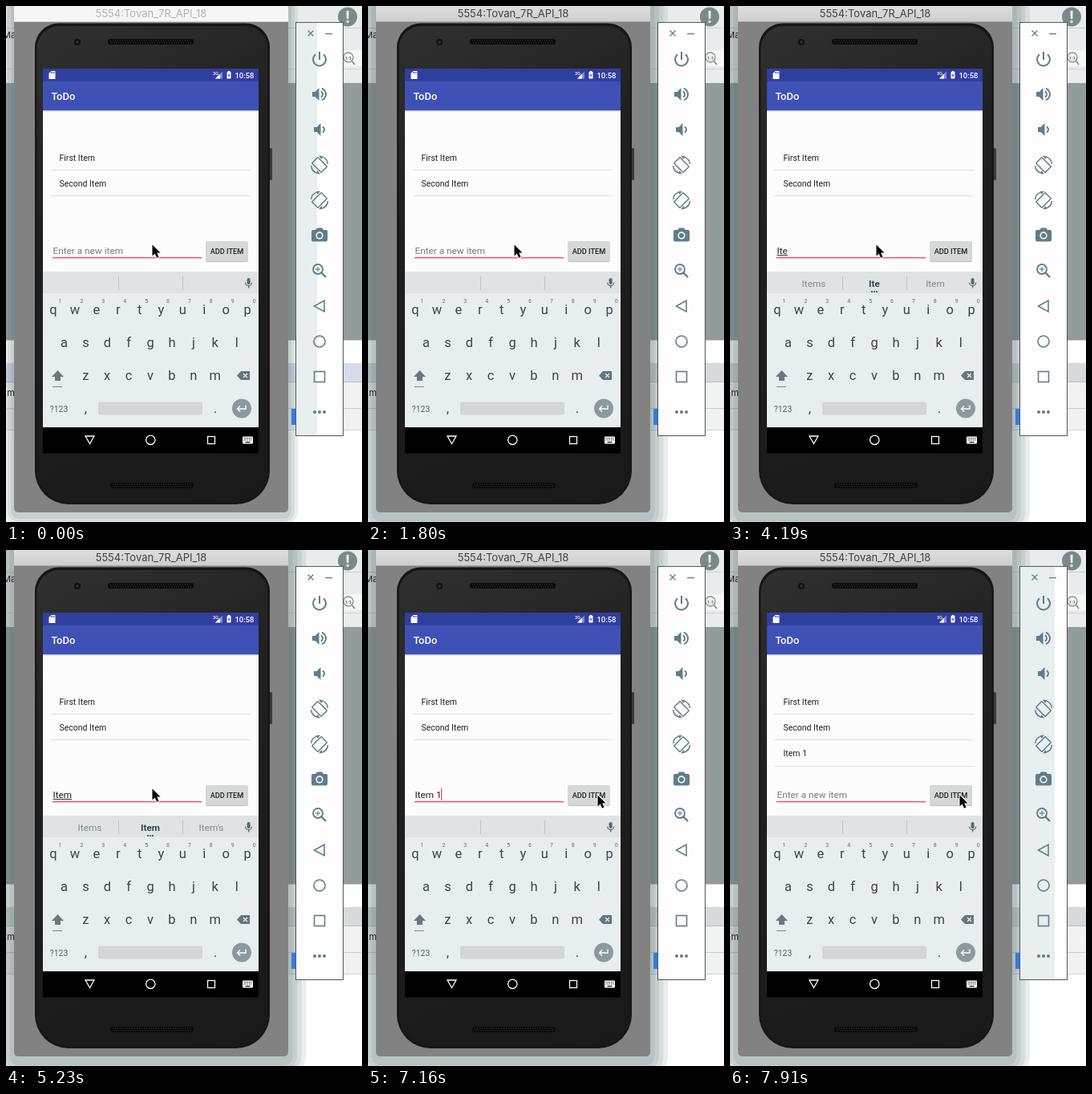
Animation, 444 px wide and 643 px high, one loop 8 s. Source, as an HTML page with a canvas:

```html
<!DOCTYPE html>
<html lang="en">
<head>
<meta charset="utf-8">
<title>ToDo on an emulator</title>
<style>
html, body { margin: 0; width: 100%; height: 100%; overflow: hidden; background: #fff; }
canvas { display: block; width: 444px; height: 643px; }
</style>
</head>
<body>
<canvas id="stage" width="444" height="643"></canvas>
<script>
const c = document.getElementById('stage').getContext('2d');
const LOOP = 8000;
const SLATE = '#607d8b', KEY = '#37474f', PINK = '#ff4081';
const ROBOTO = 'Roboto, sans-serif', INTER = 'Inter, sans-serif';
const LEFT = 46, WIDTH = 269;

// [time, text, caret shown, composing, suggestions]
const IT = ['If', 'It', "It's"], ITE = ['Items', 'Ite', 'Item'], ITEM = ['Items', 'Item', "Item's"];
const typing = [
  [0, '', 0], [150, '', 1], [600, '', 0], [1050, '', 1], [1650, '', 0],
  [2100, '', 1], [2700, '', 0],
  [3000, 'I', 1, 1], [3150, 'I', 1, 1, ["I'm", 'I', "I'll"]],
  [3290, 'It', 1, 1, IT], [3590, 'Ite', 1, 1, IT],
  [3740, 'Ite', 1, 1, ITE], [4190, 'Ite', 0, 1, ITE],
  [4490, 'Item', 1, 1, ITE], [4640, 'Item', 1, 1, ITEM], [5230, 'Item', 0, 1, ITEM],
  [5680, 'Item', 1, 1, ITEM], [5830, 'Item ', 1, 0],
  [5980, 'Item 1', 1, 0], [6580, 'Item 1', 0, 0], [7010, 'Item 1', 1, 0],
  [7460, '', 1], [7910, '', 0]
];
const presses = [[0, '#d6d7d7'], [7310, '#c4c5c5'], [7460, '#cacbcb'], [7610, '#d0d1d1'], [7760, '#d6d7d7']];
const moves = [[0, 0], [6430, 0.06], [6580, 0.32], [6730, 0.68], [6860, 0.92], [7010, 1]];
const tints = [[0, 26], [1800, 0], [7310, 43]]; // width of the panel's grey part
const at = (list, t) => list.filter(s => s[0] <= t).pop();

function rect(x, y, w, h, fill) { c.fillStyle = fill; c.fillRect(x, y, w, h); }
function round(x, y, w, h, r, fill) {
  c.beginPath(); c.roundRect(x, y, w, h, r);
  c.fillStyle = fill; c.fill();
}
function disc(x, y, r, fill) {
  c.beginPath(); c.arc(x, y, r, 0, 7);
  c.fillStyle = fill; c.fill();
}
function ring(x, y, r, color, w, from = 0, to = Math.PI * 2) {
  c.beginPath(); c.arc(x, y, r, from, to);
  c.strokeStyle = color; c.lineWidth = w; c.stroke();
}
function path(pts, x = 0, y = 0, closed) {
  c.beginPath();
  for (let i = 0; i < pts.length; i += 2) c.lineTo(x + pts[i], y + pts[i + 1]);
  if (closed) c.closePath();
}
function poly(pts, x, y, fill) { path(pts, x, y, true); c.fillStyle = fill; c.fill(); }
function line(pts, x, y, color, w, closed) {
  path(pts, x, y, closed);
  c.strokeStyle = color; c.lineWidth = w; c.stroke();
}
function text(s, x, y, size, color, align = 'left', weight = 400, family = ROBOTO) {
  c.font = `${weight} ${size}px ${family}`;
  c.textAlign = align;
  c.fillStyle = color;
  c.fillText(s, x, y);
}

function drawDesktop(active) {
  rect(0, 0, 444, 643, '#fff');
  rect(0, 0, 444, 96, '#e9ecec');
  rect(0, 27, 444, 1, '#c9cdcd');
  rect(0, 78, 444, 1, '#cfd3d3');
  rect(0, 96, 444, 320, '#929c9c');
  rect(0, 416, 444, 1, '#c4c8c8');
  rect(0, 445, 444, 23, active ? '#d6dada' : '#d6dcec');
  rect(0, 468, 444, 1, '#b9bdbf');
  rect(0, 469, 444, 32, '#f1f3f3');
  rect(0, 501, 444, 1, '#c8cccc');
  rect(0, 502, 444, 26, '#f0f2f2');
  rect(0, 528, 444, 1, '#d2d5d5');
  disc(426, 13.5, 12, '#7b8a89');
  text('!', 426, 20.5, 20, '#fff', 'center', 700);
  round(417, 55, 30, 20, 3, '#f5f6f6');
  ring(427, 64, 6, '#879292', 1.3);
  line([4, 4, 8, 9], 427, 64, '#879292', 1.8);
  text('1:1', 427, 66.5, 6, '#5f6a6a', 'center', 700);

  // banded window shadow
  const step = active ? 5.5 : 4;
  for (let i = active ? 4 : 3; i > 0; i--) {
    const d = i * step;
    round(10 - d, -20, 342 + d * 2, 651 + d + step, 6 + d, 'rgba(70,92,92,.11)');
  }
  text('Ma', -4, 40, 11, '#222', 'left', 400, INTER);
  text('.m', -2, 486, 11, '#222', 'left', 400, INTER);
  rect(356, 502, 5, 20, '#2d7fe0');

  round(10, -20, 342, 651, 5, '#828282');
  const g = c.createLinearGradient(0, 0, 0, 20);
  g.addColorStop(0, active ? '#dedede' : '#f6f6f6');
  g.addColorStop(1, active ? '#cdcdcd' : '#f6f6f6');
  rect(10, 0, 342, 20, g);
  rect(10, 19, 342, 1, active ? '#aaa' : '#d5d5d5');
  text('5554:Tovan_7R_API_18', 181, 14, 13, active ? '#404040' : '#b3b3b3', 'center', 400, INTER);
}

function grille(x, y, w) {
  round(x, y, w, 7, 3, '#0b0b0b');
  for (let i = 3; i < w - 2; i += 3) {
    rect(x + i, y + 1.5, 1, 1.3, '#303030');
    rect(x + i + 1, y + 4, 1, 1.3, '#303030');
  }
}

function drawPhone() {
  round(328, 177, 4, 40, 1.5, '#3a3a3a');
  const g = c.createLinearGradient(36, 22, 328, 620);
  g.addColorStop(0, '#303030');
  g.addColorStop(0.35, '#202020');
  g.addColorStop(1, '#191919');
  round(36, 21.5, 293, 599.5, [30, 30, 42, 42], '#161616');
  round(38.5, 25, 288, 593, [28, 28, 39, 39], g);
  disc(89, 45, 4, '#101010');
  disc(89, 45, 2, '#2b2e33');
  grille(127, 41, 107);
  grille(130, 594, 104);
}

function drawStatus() {
  rect(LEFT, 78, WIDTH, 16, '#303f9f');
  rect(LEFT, 94, WIDTH, 36, '#3f51b5');
  poly([3, 0, 8, 0, 8, 10, 0, 10, 0, 3], 53.5, 81, '#fff');
  [2.5, 4.3, 6.1].forEach(x => rect(53.5 + x, 82, 0.9, 2.2, '#303f9f'));
  text('3G', 258, 85.5, 5.5, '#fff', 'left', 500);
  poly([9, 0, 9, 9, 0, 9], 261, 81.5, 'rgba(255,255,255,.4)');
  poly([6, 3, 6, 9, 0, 9], 261, 81.5, '#fff');
  rect(276.7, 81, 2.6, 1.5, '#fff');
  round(275.5, 82, 5, 8.5, 0.7, '#fff');
  poly([3, 1.5, 1, 4.8, 2.4, 4.8, 2, 7.2, 4, 4, 2.7, 4], 275.5, 82, '#303f9f');
  text('10:58', 309.5, 89.5, 9.5, '#fff', 'right', 500);
  text('ToDo', 56.5, 116.5, 13, '#fff', 'left', 500);
}

function drawForm(s, t) {
  rect(LEFT, 130, WIDTH, 201, '#fcfcfc');
  rect(LEFT, 130, WIDTH, 1, '#c5c7cf');
  rect(LEFT, 131, WIDTH, 1, '#e8e8ea');
  const items = ['First Item', 'Second Item'];
  if (t >= 7460) items.push('Item 1');
  items.forEach((name, i) => {
    text(name, 66.5, 193 + i * 32.2, 10.5, '#212121');
    rect(56, 204 + Math.round(i * 32.4), 248, 1, '#dedede');
  });

  const [, word, caret, composing] = s;
  text(word || 'Enter a new item', 58.5, 309, 11.8, word ? '#212121' : '#7b7b7b');
  c.font = `400 11.8px ${ROBOTO}`;
  const end = 58.5 + c.measureText(word).width;
  if (composing) rect(58.5, 310, end - 58.5, 1, '#333');
  if (caret) rect(Math.round(end - 0.4), 297, 1.3, 15, PINK);
  rect(58, 313, 186, 1.4, PINK);

  round(249, 294, 53, 25, 2, '#bdbdbd');
  round(249, 293, 53, 25, 2, at(presses, t)[1]);
  text('ADD ITEM', 275.5, 309, 9.2, '#212121', 'center', 500);
}

function drawKeyboard(words) {
  rect(LEFT, 331, WIDTH, 27, '#dfe3e5');
  rect(LEFT, 358, WIDTH, 167, '#e8edf0');
  rect(140, 337, 1, 17, '#bcc3c6');
  rect(220, 337, 1, 17, '#bcc3c6');
  if (words) {
    words.forEach((w, i) => {
      text(w, [104.5, 180, 256][i], 350, 11.8, i === 1 ? KEY : '#7d8a90', 'center', i === 1 ? 700 : 400);
    });
    [176, 179, 182].forEach(x => rect(x, 355, 2, 2, '#55646b'));
  }
  round(300.6, 339, 4, 8, 2, '#58676e');
  ring(302.6, 344.5, 4, '#58676e', 1.2, 0, Math.PI);
  rect(302, 348.5, 1.3, 3, '#58676e');

  [['qwertyuiop', 59, 384], ['asdfghjkl', 72.5, 425], ['zxcvbnm', 99.3, 466]].forEach(([keys, x, y], row) => {
    [...keys].forEach((k, i) => {
      text(k, x + i * 26.9, y, 16.5, KEY, 'center');
      if (!row) text((i + 1) % 10, x + 8.5 + i * 26.9, 369.5, 7, '#607078', 'center');
    });
  });

  poly([7.5, 0, 15, 8, 11, 8, 11, 13, 4, 13, 4, 8, 0, 8], 57, 454, '#6b797f');
  rect(58, 474, 12, 1, '#7c898e');
  poly([5, 0, 16, 0, 16, 11, 5, 11, 0, 5.5], 288, 455, '#66757c');
  line([0, 0, 5, 5], 296, 458, '#e8edf0', 1.3);
  line([5, 0, 0, 5], 296, 458, '#e8edf0', 1.3);
  text('?123', 66, 505.5, 10.5, '#56656c', 'center');
  text(',', 99.5, 507, 17, KEY, 'center');
  round(115, 493.5, 130, 16, 2, '#d2d6d8');
  text('.', 261, 507, 17, KEY, 'center');
  disc(294, 501.5, 12, '#8c9a9e');
  line([11, -3.5, 11, 1, 1, 1], 288, 501, '#fff', 1.3);
  line([4, -2.5, 0.5, 1, 4, 4.5], 288, 501, '#fff', 1.3);
}

function drawNav() {
  rect(LEFT, 525, WIDTH, 32.5, '#000');
  line([-5.5, -4.5, 5.5, -4.5, 0, 5], 104.5, 540.5, '#fff', 1.3, true);
  ring(180.3, 540.8, 5.7, '#fff', 1.3);
  c.strokeRect(251.5, 536.5, 9, 9);
  round(295, 536.5, 13, 9, 1, '#fff');
  for (let i = 0; i < 5; i++) {
    rect(296.5 + i * 2.2, 538, 1.1, 1.1, '#000');
    rect(296.5 + i * 2.2, 540.3, 1.1, 1.1, '#000');
  }
  rect(298.5, 543, 6, 1.1, '#000');
}

function speaker(y, waves) {
  const x = waves < 2 ? 384 : 382;
  poly([0, -3, 3.5, -3, 8.5, -8, 8.5, 8, 3.5, 3, 0, 3], x, y, SLATE);
  ring(x + 9, y, 4, SLATE, 1.9, -1.1, 1.1);
  if (waves > 1) ring(x + 9, y, 8, SLATE, 1.9, -1.2, 1.2);
}

function rotateIcon(y, dir) {
  c.save();
  c.translate(391, y);
  c.scale(dir, 1);
  ring(0, 0, 10.5, SLATE, 1.5, -1.3, -0.1);
  ring(0, 0, 10.5, SLATE, 1.5, 1.84, 3.04);
  poly([-1, -11.5, 4, -11, 2.5, -7], 0, 0, SLATE);
  poly([1, 11.5, -4, 11, -2.5, 7], 0, 0, SLATE);
  c.rotate(Math.PI / 4);
  c.beginPath();
  c.roundRect(-8.2, -5.2, 16.4, 10.4, 1);
  c.strokeStyle = SLATE;
  c.lineWidth = 1.5;
  c.stroke();
  c.restore();
}

function drawPanel(t) {
  rect(361, 20, 60, 516, '#555');
  rect(362, 21, 58, 514, '#fdfdfd');
  rect(362, 21, at(tints, t)[1], 514, '#e9eeee');
  line([-3.5, -3.5, 3.5, 3.5], 380, 34, SLATE, 1.3);
  line([3.5, -3.5, -3.5, 3.5], 380, 34, SLATE, 1.3);
  rect(398, 34, 9, 1.3, SLATE);

  ring(391, 66.5, 8, SLATE, 2, -0.9, Math.PI + 0.9);
  rect(390, 57, 2, 10, SLATE);
  speaker(110, 2);
  speaker(154, 1);
  rotateIcon(198, 1);
  rotateIcon(242, -1);

  round(381, 279, 20, 14.5, 2, SLATE);
  poly([3, 0, 9, 0, 12, 4, 0, 4], 385, 276.5, SLATE);
  disc(391, 286, 4.7, '#f5f7f7');
  disc(391, 286, 3, SLATE);

  ring(389, 328, 6, SLATE, 1.8);
  line([4, 4, 10, 10], 389, 328, SLATE, 2.4);
  line([-3, 0, 3, 0], 389, 328, SLATE, 1.2);
  line([0, -3, 0, 3], 389, 328, SLATE, 1.2);

  line([-6.5, 0, 6, -7, 6, 7], 391, 374, SLATE, 1.6, true);
  ring(391, 418, 7, SLATE, 1.6);
  c.strokeRect(384.5, 455.5, 13, 13);
  [385, 391, 397].forEach(x => disc(x, 506, 2, SLATE));
}

function drawPointer(t) {
  const k = at(moves, t)[1];
  const x = 182.5 + 104 * k, y = 297.5 + 8 * k;
  const arrow = [0, 0, 0, 14, 3.2, 11, 5.6, 16.3, 8, 15.2, 5.7, 10, 10, 10];
  c.lineJoin = 'round';
  line(arrow, x, y, '#fff', 2, true);
  c.lineJoin = 'miter';
  poly(arrow, x, y, '#000');
}

function draw(t) {
  const s = at(typing, t);
  drawDesktop(t >= 1800);
  drawPhone();
  drawStatus();
  drawForm(s, t);
  drawKeyboard(s[4]);
  drawNav();
  drawPanel(t);
  drawPointer(t);
}

const start = performance.now();
function tick() {
  draw((performance.now() - start) % LOOP);
  requestAnimationFrame(tick);
}
tick();
</script>
</body>
</html>
```
